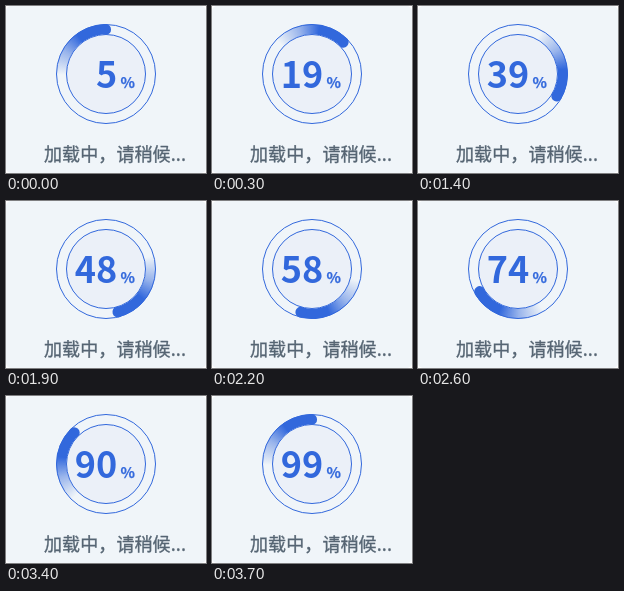
Recreate the animation shown at these times as an HTML page. Size 200 px wide and 167 px high, loop 3.9 s.

```html
<!DOCTYPE html>
<html lang="zh-CN">
<head>
<meta charset="utf-8">
<title>加载中</title>
<style>
  :root { --blue: #3268dc; }
  html, body { margin: 0; width: 100%; height: 100%; overflow: hidden; background: #fff; }
  .stage {
    position: relative; width: 200px; height: 167px;
    border-radius: 5px; background: #f0f5f9; overflow: hidden;
  }
  .sweep { position: absolute; left: 50px; top: 18px; width: 100px; height: 100px; }
  .tail {
    position: absolute; inset: 0; border-radius: 50%;
    background: conic-gradient(rgba(50, 104, 220, 0) 270deg, rgba(50, 104, 220, .46) 300deg, var(--blue) 325deg);
    -webkit-mask: radial-gradient(circle, transparent 39.4px, #000 40px);
    mask: radial-gradient(circle, transparent 39.4px, #000 40px);
  }
  .head {
    position: absolute; left: 44.5px; top: -.3px; width: 11px; height: 11px;
    border-radius: 50%; background: var(--blue);
  }
  svg { position: absolute; left: 0; top: 0; }
  circle { fill: none; stroke: var(--blue); }
  .disc { fill: #ebf0f8; }
  text { font-family: "Noto Sans CJK SC", "Noto Sans CJK", "Noto Sans", sans-serif; }
  .value, .unit { font-weight: 700; fill: var(--blue); }
  .value { font-size: 36px; text-anchor: end; }
  .unit { font-size: 15px; stroke: var(--blue); stroke-width: .25px; }
  .label { font-size: 18px; letter-spacing: .1px; fill: #566573; stroke: #566573; stroke-width: .35px; }
</style>
</head>
<body>
<div class="stage">
  <div class="sweep" id="sweep"><div class="tail"></div><div class="head"></div></div>
  <svg width="200" height="167" viewBox="0 0 200 167">
    <circle cx="100" cy="68" r="49.5"/>
    <circle class="disc" cx="100" cy="68" r="39.5"/>
    <text class="value" id="value" x="111.2" y="82">5</text>
    <text class="unit" x="114.6" y="82">%</text>
    <text class="label" x="38" y="155">加载中，请稍候...</text>
  </svg>
</div>
<script>
  const LOOP = 3900;
  const TICK = 100;
  const STEP_ANGLE = 15;
  const START_ANGLE = -1.2;
  // Key points: tick to progress step, and progress step to percentage.
  const pace = [[0, 0], [3, 3], [5, 3.9], [9, 4.4], [23, 13.48], [26, 15.8], [32, 19.4], [37, 24]];
  const percent = [[0, 5], [5, 28], [8, 39], [11, 48], [16, 74], [19, 84], [24, 99]];

  const sweep = document.getElementById('sweep');
  const value = document.getElementById('value');

  function interpolate(keys, x) {
    const next = keys.findIndex(([keyX]) => keyX > x);
    if (next < 0) return keys[keys.length - 1][1];
    const [x0, y0] = keys[next - 1];
    const [x1, y1] = keys[next];
    return y0 + (y1 - y0) * (x - x0) / (x1 - x0);
  }

  function draw(now) {
    const tick = Math.floor(now % LOOP / TICK);
    const step = Math.round(interpolate(pace, tick));
    sweep.style.transform = `rotate(${START_ANGLE + step * STEP_ANGLE}deg)`;
    value.textContent = Math.round(interpolate(percent, step));
  }

  const start = performance.now();
  function animate() {
    draw(performance.now() - start);
    requestAnimationFrame(animate);
  }
  animate();
</script>
</body>
</html>
```
